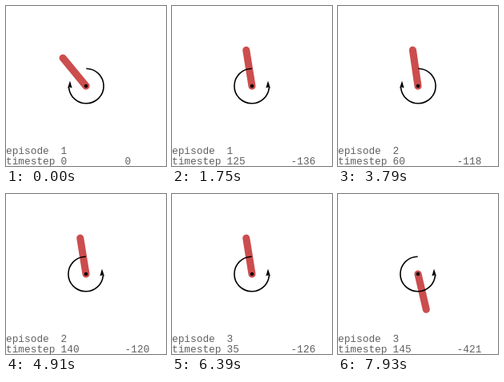
Recreate the animation shown at these times as an HTML page with a canvas. Size 200 by 200 pixels, loop 8000 ms.

```html
<!DOCTYPE html>
<html lang="en">
<head>
<meta charset="utf-8">
<title>Pendulum</title>
<style>
  html, body { margin: 0; width: 100%; height: 100%; overflow: hidden; background: #fff; }
  canvas { display: block; width: 200px; height: 200px; }
</style>
</head>
<body>
<canvas id="stage" width="200" height="200"></canvas>
<script>
const ctx = document.getElementById('stage').getContext('2d');
const LOOP = 8000, TICK = 70, EPISODE = 2950, LAST_TICK = 39;
const UNIT = 200 / 4.4, TAU = Math.PI * 2;
const STEPS = 5, DT = 0.05;  // timesteps per tick, seconds per timestep
const REST = 0.15;           // lean while balanced, radians
const REST_COST = STEPS * (REST * REST + 0.004);
const TOP = TAU + REST;      // balanced again after one turn

// Each swing passes through [tick, angle] points, counterclockwise
// from upright, and adds up to the given cost.
const episodes = [
  [{ cost: 134.2, keys: [[0, .69], [2, 1.21], [4, 3.3], [6, 5.3], [9, 6.2], [11, TOP]] }],
  [{ cost: 117.5, keys: [[0, 2.12], [1, 2.83], [3, 5.15], [5, 6.14], [7, TOP]] }],
  [
    { cost: 125.9, keys: [[0, 1.95], [2, 3.83], [4, 5.62], [7, TOP]] },
    { cost: 294.7, keys: [[10, TOP], [14, 7.63], [17, 10.63], [19, 9.48],
      [21, 7.38], [23, 6.33], [26, 5.66], [29, 3.37]] }
  ]
];

const startOf = swing => swing.keys[0][0];
const endOf = swing => swing.keys[swing.keys.length - 1][0];
const wrap = angle => angle - TAU * Math.round(angle / TAU);

function secant(keys, i) {
  return (keys[i + 1][1] - keys[i][1]) / (keys[i + 1][0] - keys[i][0]);
}

// Harmonic mean of the neighbouring slopes; flat at turning points and ends.
function slope(keys, i) {
  if (i === 0 || i === keys.length - 1) return 0;
  const a = secant(keys, i - 1), b = secant(keys, i);
  return a * b > 0 ? 2 * a * b / (a + b) : 0;
}

function angleAt({ keys }, tick) {
  let i = 0;
  while (i < keys.length - 2 && tick > keys[i + 1][0]) i++;
  const [t0, a0] = keys[i], [t1, a1] = keys[i + 1];
  const h = t1 - t0, u = Math.min(1, (tick - t0) / h), v = 1 - u;
  return a0 * v * v * (1 + 2 * u) + a1 * u * u * (1 + 2 * v)
    + h * u * v * (slope(keys, i) * v - slope(keys, i + 1) * u);
}

function rawCost(swing, tick) {
  let sum = 0;
  for (let n = startOf(swing) * STEPS; n < tick * STEPS; n++) {
    const angle = angleAt(swing, n / STEPS);
    const speed = (angleAt(swing, (n + 1) / STEPS) - angle) / DT;
    sum += wrap(angle) ** 2 + 0.1 * speed * speed + 0.004;
  }
  return sum;
}

function costAt(swings, tick) {
  let sum = 0, resting = tick;
  for (const swing of swings) {
    const start = startOf(swing), end = endOf(swing);
    if (tick <= start) continue;
    const now = Math.min(tick, end);
    sum += swing.cost * rawCost(swing, now) / rawCost(swing, end);
    resting -= now - start;
  }
  return sum + resting * REST_COST;
}

function stateAt(ms) {
  const index = Math.floor(ms / EPISODE);
  const swings = episodes[index];
  const tick = Math.min(LAST_TICK, Math.floor((ms - index * EPISODE) / TICK));
  const step = tick * STEPS;
  const swing = swings.find(s => tick >= startOf(s) && tick <= endOf(s));
  let angle = swing ? angleAt(swing, tick) : REST;
  let ccw;
  if (Math.abs(wrap(angle) - REST) < 0.01) {
    ccw = step % 3 === 2;
    angle = REST + (ccw ? 0.01 : -0.005);
  } else {
    // Push toward upright; a start from below is pushed right round.
    const fromBelow = startOf(swing) === 0 && Math.cos(swing.keys[0][1]) < 0;
    ccw = step > 0 && (fromBelow || Math.sin(angle) < 0);
  }
  return { episode: index + 1, step, angle, ccw, cost: Math.round(costAt(swings, tick)) };
}

function drawRod(angle) {
  ctx.strokeStyle = '#cc4d4d';
  ctx.lineWidth = UNIT * 0.2;
  ctx.lineCap = 'round';
  ctx.beginPath();
  ctx.moveTo(100, 100);
  ctx.lineTo(100 - UNIT * Math.sin(angle), 100 - UNIT * Math.cos(angle));
  ctx.stroke();
  ctx.fillStyle = '#000';
  ctx.beginPath();
  ctx.arc(100, 100, UNIT * 0.05, 0, TAU);
  ctx.fill();
}

function drawArrow(ccw) {
  ctx.save();
  ctx.translate(100, 100);
  if (ccw) ctx.scale(-1, 1);
  ctx.strokeStyle = ctx.fillStyle = '#000';
  ctx.lineWidth = 1.6;
  ctx.lineCap = 'butt';
  ctx.beginPath();
  ctx.arc(0.3, 0, 21.8, -Math.PI / 2, Math.PI * 0.97);
  ctx.stroke();
  ctx.beginPath();
  ctx.moveTo(-20, -6.5);
  ctx.lineTo(-23, 2.8);
  ctx.lineTo(-20.3, 1.6);
  ctx.lineTo(-17.4, 2.6);
  ctx.fill();
  ctx.restore();
}

function drawText({ episode, step, cost }) {
  ctx.font = '12.8px "Liberation Mono", "Courier New", monospace';
  ctx.fillStyle = '#606060';
  ctx.fillText('episode', 0, 185);
  ctx.fillText(episode, 68.6, 185);
  ctx.fillText('timestep', 0, 198);
  ctx.fillText(step, 68.6, 198);
  ctx.fillText(cost ? '-' + cost : '0', 148.6, 198);
}

function draw(ms) {
  const state = stateAt(ms);
  ctx.fillStyle = '#fff';
  ctx.fillRect(0, 0, 200, 200);
  drawRod(state.angle);
  drawArrow(state.ccw);
  drawText(state);
}

const start = performance.now();
function frame() {
  draw((performance.now() - start) % LOOP);
  requestAnimationFrame(frame);
}
frame();
</script>
</body>
</html>
```
